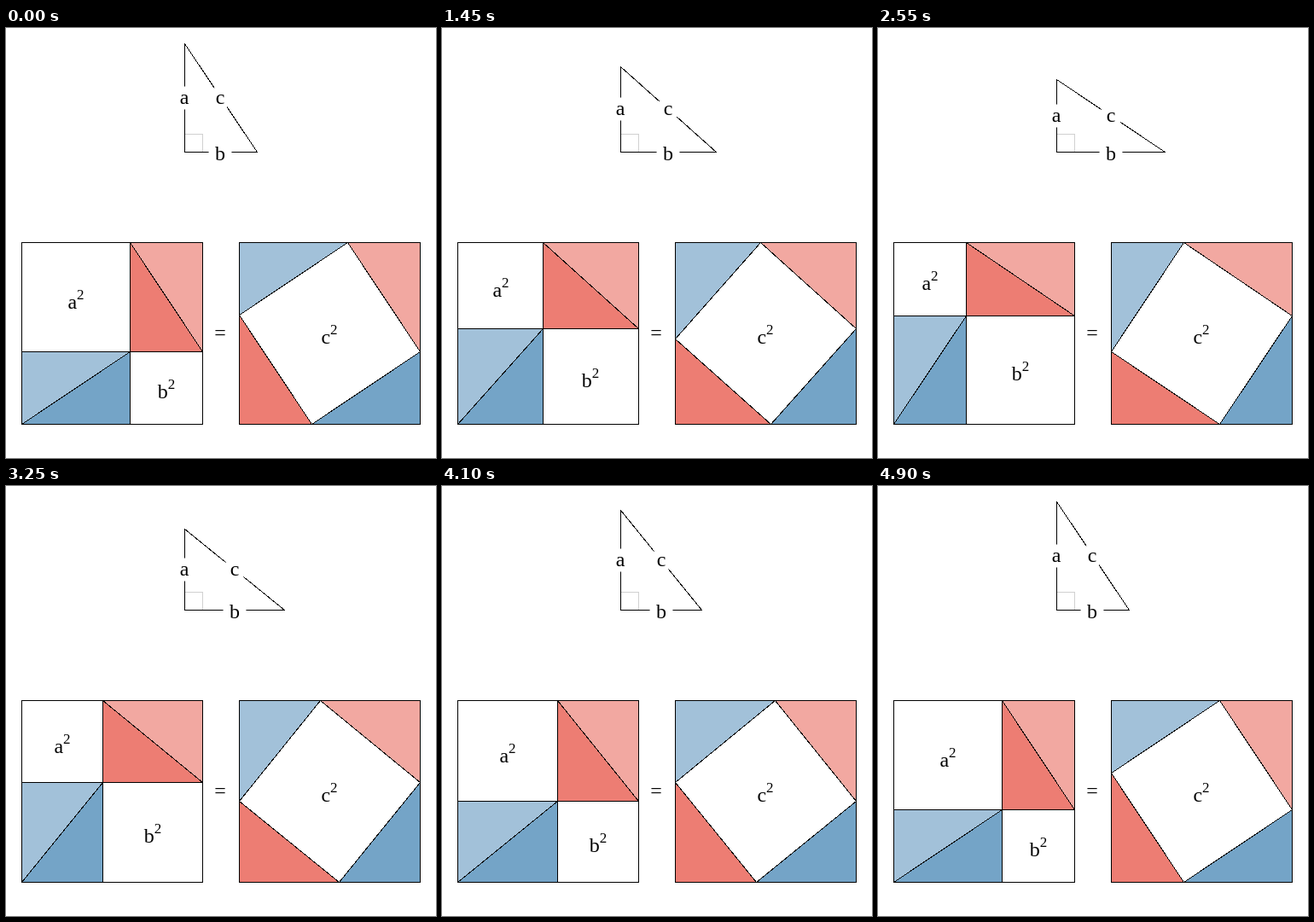
Animation, 504 px wide and 504 px high, one loop 4950 ms. Source, as an HTML page:

```html
<!DOCTYPE html>
<html lang="en">
<head>
<meta charset="utf-8">
<title>Pythagorean theorem</title>
<style>
  html, body { margin: 0; width: 100%; height: 100%; overflow: hidden; background: #fff; }
  svg { display: block; width: 504px; height: 504px; }
  path { shape-rendering: crispEdges; }
  text { font: 24px "Liberation Serif", "Times New Roman", serif; }
  .sup { font-size: 17px; }
</style>
</head>
<body>
<svg id="stage" viewBox="0 0 504 504"></svg>
<script>
const UNIT = 42.5, SIDE = 5 * UNIT, STEP = 50, STEPS = 99;
const LEFT = 18.4, RIGHT = LEFT + 6 * UNIT, TOP = 251.9;
const CORNER = { x: 209.5, y: 145.5 };
const BLUE = '#74a4c7', PALE_BLUE = '#a2c1d9', RED = '#ed7d73', PALE_RED = '#f2a8a1';
const stage = document.getElementById('stage');

function add(tag, attrs = {}, parent = stage) {
  const el = document.createElementNS('http://www.w3.org/2000/svg', tag);
  for (const key in attrs) el.setAttribute(key, attrs[key]);
  return parent.appendChild(el);
}

const fillPath = color => add('path', { fill: color });
const linePath = color => add('path', { fill: 'none', stroke: color });
const snap = v => Math.floor(v + 0.01) + 0.5;
const poly = (...points) => 'M' + points.map(p => p.map(snap).join(' ')).join('L');
const closed = (...points) => poly(...points) + 'Z';

function label(name, squared) {
  const group = add('g');
  if (!squared) add('circle', { r: 13.5, fill: '#fff' }, group);
  const y = squared ? 13 : name === 'b' ? 9 : 7;
  const text = add('text', { y, 'text-anchor': 'middle' }, group);
  text.textContent = name;
  if (squared) {
    const sup = add('tspan', { class: 'sup', dy: -11 }, text);
    sup.textContent = '2';
  }
  return (x, y) => group.setAttribute('transform', `translate(${Math.round(x)} ${Math.round(y)})`);
}

const fills = [PALE_RED, RED, PALE_BLUE, BLUE, PALE_BLUE, PALE_RED, BLUE, RED].map(fillPath);
const mark = linePath('#d0d0d0');
const lines = linePath('#000');
const sideA = label('a'), sideB = label('b'), sideC = label('c');
const areaA = label('a', true), areaB = label('b', true), areaC = label('c', true);
add('text', { x: 251, y: 365, 'text-anchor': 'middle' }).textContent = '=';
mark.setAttribute('d', poly([209, 124], [230, 124], [230, 145]));

function draw(time) {
  const step = Math.floor(time / STEP) % STEPS;
  const a = UNIT * (2.5 + 0.5 * Math.cos(2 * Math.PI * step / (STEPS - 1)));
  const b = SIDE - a;
  const bottom = TOP + SIDE, midY = TOP + a;
  const endL = LEFT + SIDE, endR = RIGHT + SIDE, midX = LEFT + a;

  // inner corners of the tilted square
  const n = [RIGHT + a, TOP], e = [endR, midY], s = [RIGHT + b, bottom], w = [RIGHT, TOP + b];
  const center = [midX, midY], upper = [midX, TOP], side = [endL, midY];
  const edge = [LEFT, midY], low = [LEFT, bottom], foot = [midX, bottom];

  [
    closed(upper, [endL, TOP], side),
    closed(upper, center, side),
    closed(edge, center, low),
    closed(center, foot, low),
    closed([RIGHT, TOP], n, w),
    closed(n, [endR, TOP], e),
    closed(e, [endR, bottom], s),
    closed(s, [RIGHT, bottom], w)
  ].forEach((d, i) => fills[i].setAttribute('d', d));

  const { x, y } = CORNER;
  lines.setAttribute('d', [
    closed([x, y - a], [x, y], [x + b, y]),
    closed([LEFT, TOP], [endL, TOP], [endL, bottom], low),
    poly(upper, foot),
    poly(edge, side),
    poly(upper, side),
    poly(low, center),
    closed([RIGHT, TOP], [endR, TOP], [endR, bottom], [RIGHT, bottom]),
    closed(n, e, s, w)
  ].join(''));

  sideA(x - 0.1, y - a / 2);
  sideB(x + b / 2 - 0.6, y);
  sideC(x + b / 2 - 0.6, y - a / 2);
  areaA(LEFT + a / 2, TOP + a / 2);
  areaB(midX + b / 2 - 0.5, midY + b / 2 - 0.5);
  areaC(RIGHT + SIDE / 2 - 1, TOP + SIDE / 2 - 1);
}

const start = performance.now();
function tick() {
  draw(performance.now() - start);
  requestAnimationFrame(tick);
}
tick();
</script>
</body>
</html>
```
